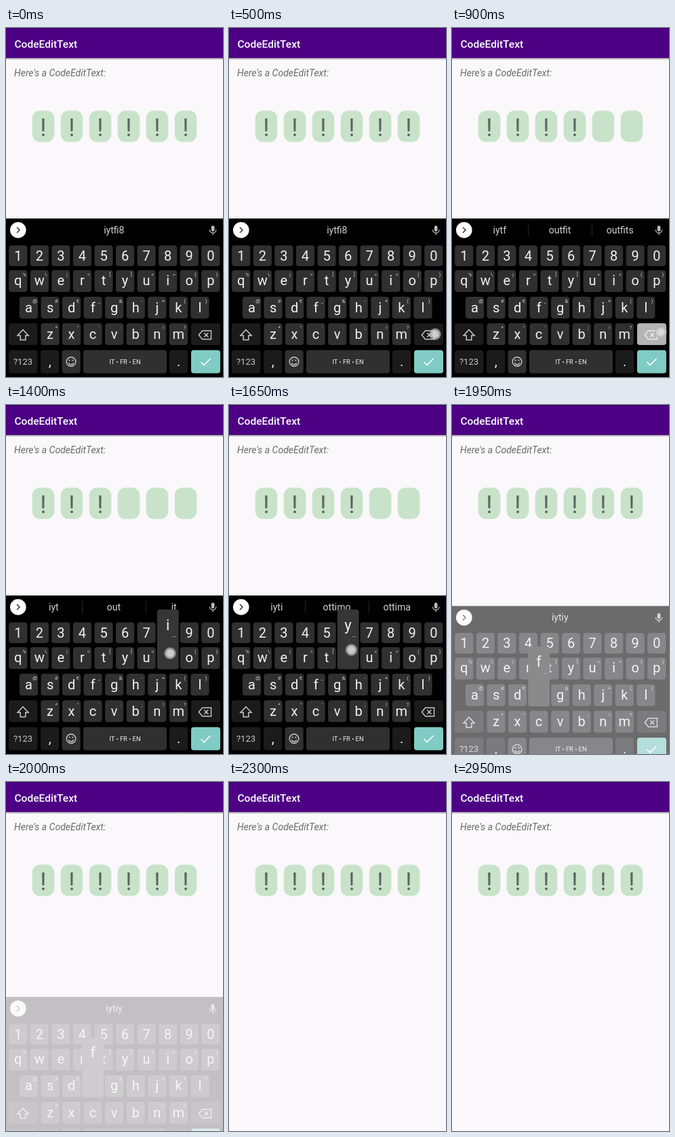
An HTML page that plays this animation: 320 by 513 pixels, repeating every 3 s.

```html
<!DOCTYPE html>
<html lang="en">
<head>
<meta charset="utf-8">
<title>CodeEditText</title>
<style>
html, body { margin: 0; width: 100%; height: 100%; overflow: hidden; background: #faf8fa; }
svg { display: block; width: 100vw; height: 100vh; font-family: Roboto, sans-serif; }
</style>
</head>
<body>
<svg id="stage" viewBox="0 0 320 513"></svg>
<script>
const LOOP = 3000, STEP = 50, PITCH = 31.55;
const KEY = '#303031', DARK = '#1b1b1c', INK = '#f1f1f1', SOFT = '#c9c9c9';

const esc = s => s.replace(/&/g, '&amp;').replace(/</g, '&lt;');
const rect = (x, y, w, h, fill, r = 0) =>
  `<rect x="${x}" y="${y}" width="${w}" height="${h}" rx="${r}" fill="${fill}"/>`;
const text = (s, x, y, size, fill, extra = 'text-anchor="middle"') =>
  `<text x="${x}" y="${y}" font-size="${size}" fill="${fill}" ${extra}>${esc(s)}</text>`;
const line = (d, color, width = 1.5) =>
  `<path d="${d}" fill="none" stroke="${color}" stroke-width="${width}"/>`;

// Letter rows: characters, hints, centre of first key, top, height, baseline
const rows = [
  ['1234567890', '', 17.8, 319.5, 30.5, 342],
  ['qwertyuiop', '%\\|=[]<>()', 17.8, 356, 32, 378],
  ['asdfghjkl', '@#€_&-+()', 33.5, 395, 32, 417.5],
  ['zxcvbnm', '*"\':;!?', 65, 434, 32, 457]
];

function letterKeys([chars, hints, first, top, height, base]) {
  return [...chars].map((c, i) => {
    const x = first + i * PITCH;
    return rect(x - 13.6, top, 27.2, height, KEY, 4) + text(c, x, base, 20, INK) +
      (hints ? text(hints[i], x + 9.2, top + 8.5, 8, SOFT) : '');
  }).join('');
}

const mic = rect(302.8, 290.5, 4.6, 8.5, '#bdbdbd', 2.3) +
  line('M300.4 296.5a4.7 4.7 0 0 0 9.4 0M305.1 301v3.2', '#bdbdbd', 1.3);
const shift = line('M25 443.5l-8 8.5h4.2v6.5h7.6v-6.5h4.2z', SOFT);
const emoji = `<circle cx="96" cy="490.5" r="6.8" fill="none" stroke="${SOFT}" stroke-width="1.4"/>` +
  `<circle cx="93.6" cy="488.5" r="1.1" fill="${SOFT}"/><circle cx="98.4" cy="488.5" r="1.1" fill="${SOFT}"/>` +
  line('M92.3 492.3a4 4 0 0 0 7.4 0', SOFT, 1.4);

const keyboard = rect(0, 280, 320, 300, '#000') +
  '<circle cx="17.8" cy="297" r="11.8" fill="#fff"/>' +
  line('M16 293l4 4l-4 4', '#333') + mic +
  rows.map(letterKeys).join('') +
  rect(4, 434, 42.5, 32, DARK, 4) + shift +
  rect(4, 473.5, 42.5, 34, DARK, 4) + text('?123', 25, 495, 13, SOFT) +
  rect(51, 473.5, 27.2, 34, DARK, 4) + text(',', 64.7, 497, 20, INK) +
  rect(82.5, 473.5, 27.2, 34, KEY, 4) + emoji +
  rect(114, 473.5, 123, 34, KEY, 4) + text('IT • FR • EN', 175.5, 494, 9.3, INK) +
  rect(241, 473.5, 27.2, 34, DARK, 4) + text('.', 254.7, 497, 20, INK) +
  rect(273, 473.5, 43, 34, '#80cbc4', 4) + line('M287.5 491l4.5 4.5l9.5-9.5', '#fff', 1.7);

const cellX = i => 55 + i * 42;
const each = (n, fn) => Array.from({ length: n }, (_, i) => fn(i)).join('');

document.getElementById('stage').innerHTML =
  `<defs>
    <linearGradient id="shade" x2="0" y2="1"><stop stop-color="#8d8592"/><stop offset="1" stop-color="#faf8fa"/></linearGradient>
    <radialGradient id="dot"><stop offset=".45" stop-color="#ddd"/><stop offset=".8" stop-color="#bbb" stop-opacity=".75"/><stop offset="1" stop-color="#999" stop-opacity="0"/></radialGradient>
  </defs>` +
  rect(0, 0, 320, 513, '#faf8fa') + rect(0, 44, 320, 3, 'url(#shade)') +
  rect(0, 0, 320, 44, '#4d0084') + rect(0, 0, 320, 1, '#38006a') +
  text('CodeEditText', 12.4, 29, 15.56, '#fff', 'font-weight="500"') +
  text("Here's a CodeEditText:", 12, 71, 14, '#6c6b6c', 'font-style="italic"') +
  each(6, i => rect(cellX(i) - 16.3, 121.5, 32.6, 46, '#c8e3c9', 11.5)) +
  `<g id="marks"></g><g id="board">${keyboard}<g id="live"></g></g>`;

const [marks, board, live] = ['marks', 'board', 'live'].map(id => document.getElementById(id));

// Start time, filled cells, suggestions
const states = [
  [0, 6, 'iytfi8'],
  [550, 5, 'iytfi', 'outfit', 'outfits'],
  [750, 4, 'iytf', 'outfit', 'outfits'],
  [950, 3, 'iyt', 'out', 'it'],
  [1500, 4, 'iyti', 'ottimo', 'ottima'],
  [1700, 5, 'iytiy'],
  [1900, 6, 'iytiy']
];

// Touch start, end, x, y
const touches = [
  [500, 600, 304, 450], [700, 800, 306, 448], [850, 1000, 308, 447],
  [1400, 1500, 242, 365], [1600, 1700, 180.5, 360], [1800, 1900, 142.5, 408.5]
];

// Popup start, end, letter, x, key bottom
const popups = [
  [1400, 1500, 'i', 7, 1], [1600, 1700, 'y', 5, 1], [1800, 2200, 'f', 3, 2]
].map(([from, to, c, col, row]) => [from, to, c, rows[row][2] + col * PITCH, rows[row][3] + 32.5]);

const backspace = held => rect(273, 434, 43, 32, held ? '#b4b4b4' : DARK, 4) +
  line('M289.5 445h13v12.5h-13l-5.2-6.25zM292.3 448.2l6 6m0-6l-6 6', held ? '#eee' : SOFT, 1.4);

function suggestions(words) {
  if (words.length === 1) return text(words[0], 159.3, 302, 14, '#d2d2d2');
  return words.map((w, i) => text(w, 70.3 + i * 88.7, 302, 14, '#d2d2d2')).join('') +
    rect(112, 288, 1, 18, '#252525') + rect(206, 288, 1, 18, '#252525');
}

const popup = ([, , c, x, bottom]) => rect(x - 15.8, bottom - 88, 31.8, 88, '#363637', 4) +
  text(c, x, bottom - 58, 22, INK) + text('…', x + 9, bottom - 48, 9, INK);

function touch([, end, x, y], t) {
  const alpha = t < end ? .9 : .35;
  return `<circle cx="${x}" cy="${y}" r="9.5" fill="url(#dot)" opacity="${alpha}"/>`;
}

function draw(t) {
  const [, count, ...words] = states.findLast(s => s[0] <= t);
  marks.innerHTML = each(count, i => text('!', cellX(i), 159, 36, '#5b685c'));

  const alpha = Math.min(1, Math.max(0, 1 - (t - 1887) / 145));
  const drop = .00171 * Math.max(0, t - 1855) ** 2;
  board.setAttribute('opacity', alpha);
  board.setAttribute('transform', `translate(0 ${drop})`);

  const held = touches.some(([a, b, x]) => x > 300 && t > a && t < b);
  live.innerHTML = backspace(held) + suggestions(words) +
    popups.filter(([a, b]) => t >= a && t < b).map(popup).join('') +
    touches.filter(([a, b]) => t >= a && t <= b).map(p => touch(p, t)).join('');
}

const start = performance.now();
let last = -1;
function frame() {
  const t = Math.floor((performance.now() - start) % LOOP / STEP) * STEP;
  if (t !== last) draw(last = t);
  requestAnimationFrame(frame);
}
frame();
</script>
</body>
</html>
```
